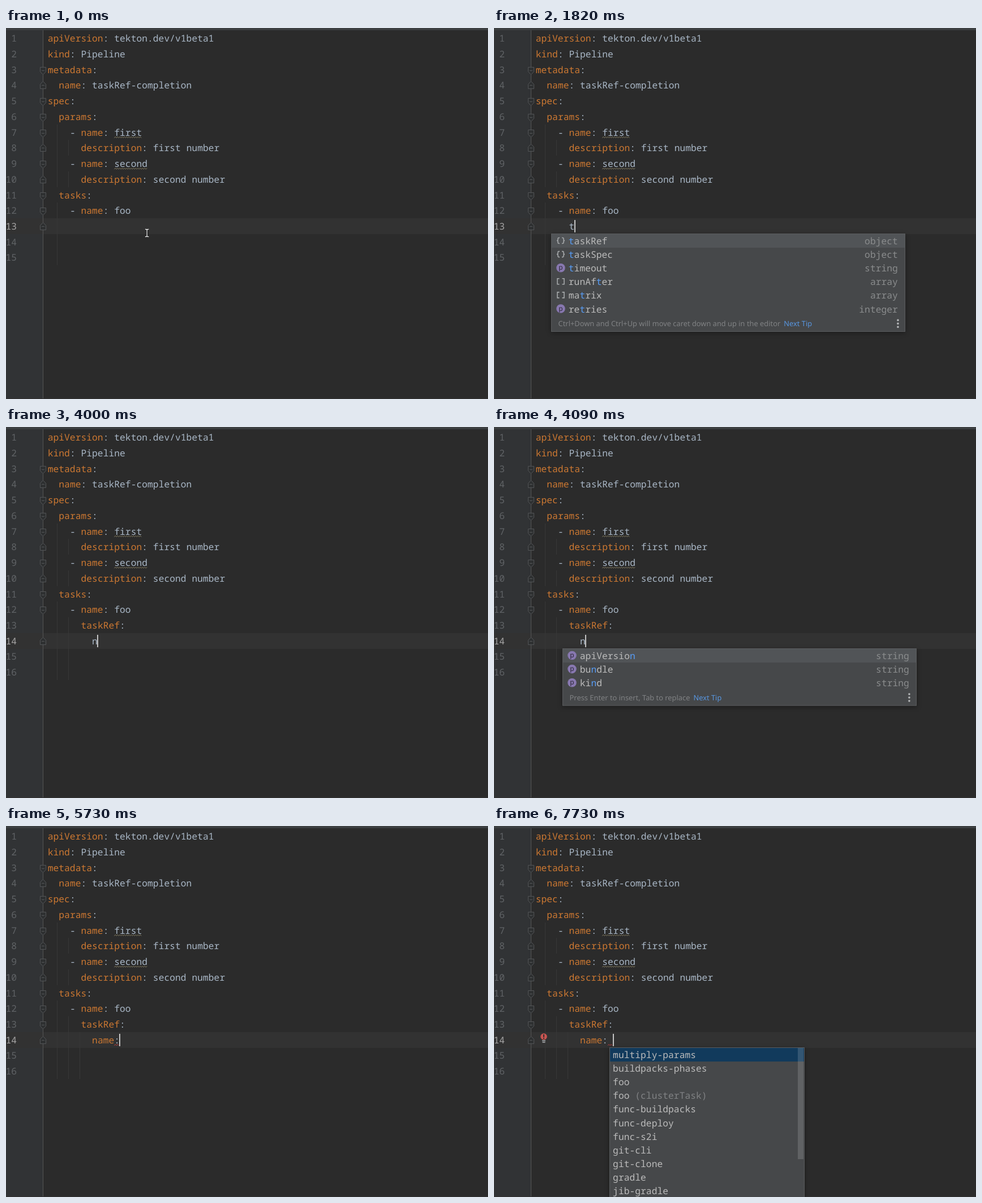
Animation, 852 px wide and 657 px high, one loop 8 s. Source, as an HTML page:

```html
<!DOCTYPE html>
<html lang="en">
<head>
<meta charset="utf-8">
<title>Editor completion</title>
<style>
  html, body { margin: 0; width: 100%; height: 100%; overflow: hidden; background: #2b2b2b; }
  svg { display: block; width: 852px; height: 657px; }
  text { font: 16.33px "Noto Sans Mono", "DejaVu Sans Mono", monospace; fill: #a9b7c6; white-space: pre; text-rendering: geometricPrecision; }
  .key { fill: #cc7832; }
  .num { fill: #606366; text-anchor: end; }
  .num.now { fill: #a4a3a3; }
  .item { fill: #bbbbbb; }
  .hit, .link { fill: #589df6; }
  .type { fill: #8a8c8d; text-anchor: end; }
  .dim { fill: #808284; }
  .tip { font: 12.85px "Noto Sans", "Open Sans", sans-serif; fill: #808284; }
  .tip .link { fill: #5896e0; }
  .letter { font: 12px "Noto Sans", sans-serif; fill: #2b2735; text-anchor: middle; }
  .wave, .icon { fill: none; }
  .icon { stroke: #a6a9ab; stroke-width: 1.6; }
  .fold { fill: #2e3031; stroke: #535557; }
  .guide { stroke: #373737; }
  .popup { filter: drop-shadow(0 2px 4px rgba(0, 0, 0, .35)); }
</style>
</head>
<body>
<svg id="stage" viewBox="0 0 852 657" xmlns="http://www.w3.org/2000/svg"></svg>
<script>
const LOOP = 8000, LEFT = 73.7, CHAR = 9.8, PITCH = 27.72, ROW = 24.1;
const stage = document.getElementById('stage');

const code = [
  'apiVersion: tekton.dev/v1beta1',
  'kind: Pipeline',
  'metadata:',
  '  name: taskRef-completion',
  'spec:',
  '  params:',
  '    - name: first',
  '      description: first number',
  '    - name: second',
  '      description: second number',
  '  tasks:',
  '    - name: foo'
];

const menus = {
  task: {
    x: 101, y: 364, w: 626, hit: 't',
    tip: 'Ctrl+Down and Ctrl+Up will move caret down and up in the editor',
    rows: ['taskRef object', 'taskSpec object', 'timeout string', 'runAfter array', 'matrix array', 'retries integer']
  },
  ref: {
    x: 121, y: 392, w: 626, hit: 'n',
    tip: 'Press Enter to insert, Tab to replace',
    rows: ['apiVersion string', 'bundle string', 'kind string']
  }
};
const taskNames = ['multiply-params', 'buildpacks-phases', 'foo', 'foo (clusterTask)', 'func-buildpacks',
  'func-deploy', 'func-s2i', 'git-cli', 'git-clone', 'gradle', 'jib-gradle'];

// Each step changes only the listed parts of the state.
const steps = [
  [0, { row: 13, total: 15, end: 13, first: '', second: '', mouse: true, caret: null }],
  [450, { caret: 6 }],
  [1550, { first: 't', caret: 7, mouse: false }],
  [1640, { popup: () => shade(101, 364, 626, 174) }],
  [1730, { popup: () => menu(menus.task) }],
  [2640, { caret: null }],
  [2730, { popup: null }],
  [2820, { first: 'taskRef:', row: 14, total: 16, caret: 8 }],
  [3090, { end: 14 }],
  [4000, { second: 'n', caret: 9 }],
  [4090, { popup: () => menu(menus.ref) }],
  [4360, { second: 'na', caret: 10 }],
  [4450, { popup: null }],
  [4730, { second: 'nam', caret: 11 }],
  [4910, { second: 'name', caret: 12 }],
  [5270, { second: 'name:', caret: 13 }],
  [5730, { nested: true, error: 12 }],
  [5910, { second: 'name: ', caret: 14 }],
  [6270, { error: 13 }],
  [7000, { popup: () => shade(204.5, 392, 345, 53) }],
  [7090, { popup: () => names(1) }],
  [7450, { bulb: true }],
  [7730, { popup: () => names(taskNames.length) }]
];
let state = {};
const states = steps.map(([, change]) => state = { ...state, ...change });

const colX = col => LEFT + col * CHAR;
const midY = line => 18.3 + (line - 1) * PITCH;
const topY = line => Math.round(midY(line) - PITCH / 2);
const rect = (x, y, w, h, fill, more = '') => `<rect x="${x}" y="${y}" width="${w}" height="${h}" fill="${fill}" ${more}/>`;
const text = (x, y, body, cls = '') => `<text x="${x}" y="${Math.round(y)}" class="${cls}">${body}</text>`;
const span = (body, cls) => `<tspan class="${cls}">${body}</tspan>`;

function codeLine(line, source) {
  const indent = source.search(/\S/);
  if (indent < 0) return '';
  const body = source.trimStart().replace(/^(- )?(\w+)(?=:)/, (_, dash = '', key) => dash + span(key, 'key'));
  return text(colX(indent), midY(line) + 6, body);
}

function wave(line, from, to, color) {
  const y = midY(line) + 9;
  let d = '';
  for (let x = colX(from), i = 0; x <= colX(to); x += 2, i++)
    d += `${i ? 'L' : 'M'}${x.toFixed(1)} ${(y + (i % 2 ? -1.1 : 1.1)).toFixed(1)}`;
  return `<path class="wave" d="${d}" stroke="${color}"/>`;
}

function fold(line, closing) {
  const y = Math.round(midY(line)) + (closing ? 6.5 : -4.5), s = closing ? -1 : 1;
  return `<path class="fold" d="M60.5 ${y}H70.5V${y + 8 * s}L65.5 ${y + 13 * s}L60.5 ${y + 8 * s}ZM63 ${y + 6 * s}H68"/>`;
}

function guide(col, from, to) {
  const x = Math.floor(colX(col) - 2.4) + .5;
  return `<path class="guide" d="M${x} ${topY(from)}V${topY(to + 1)}"/>`;
}

const shade = (x, y, w, h) => rect(x, y, w, h, '#2b2b2b', 'class="popup"');
const frame = (x, y, w, h) => rect(x + .5, y + .5, w - 1, h - 1, '#46484a', 'stroke="#5b5d5f" class="popup"');

function icon(type, x, y) {
  if (type === 'object')
    return `<path class="icon" d="M${x - 2} ${y - 5}h-1.5q-1.5 0-1.5 1.5v2q0 1.5-2 1.5q2 0 2 1.5v2q0 1.5 1.5 1.5h1.5M${x + 2} ${y - 5}h1.5q1.5 0 1.5 1.5v2q0 1.5 2 1.5q-2 0-2 1.5v2q0 1.5-1.5 1.5h-1.5"/>`;
  if (type === 'array')
    return `<path class="icon" d="M${x - 2.5} ${y - 5}h-3.5v10h3.5M${x + 2.5} ${y - 5}h3.5v10h-3.5"/>`;
  return `<circle cx="${x}" cy="${y}" r="7.8" fill="#8878b0"/>` + text(x, y + 3.6, 'p', 'letter');
}

function tipBar(x, y, w, tip) {
  const dots = [-6, 0, 6].map(d => `<circle cx="${x + w - 13}" cy="${y + d}" r="1.8" fill="#b4b6b8"/>`).join('');
  return text(x + 12.6, y + 4.6, `${tip}<tspan class="link" dx="6">Next Tip</tspan>`, 'tip') + dots;
}

function menu({ x, y, w, hit, tip, rows }) {
  const h = rows.length * ROW + 29.4;
  let out = frame(x, y, w, h) + rect(x + 1, y + 1, w - 2, ROW, '#515457');
  rows.forEach((row, i) => {
    const [name, type] = row.split(' '), mid = y + 13 + i * ROW;
    out += icon(type, x + 17, mid - .5)
      + text(x + 30.8, mid + 6, name.replace(hit, span(hit, 'hit')), 'item')
      + text(x + 612.9, mid + 6, type, 'type');
  });
  return out + tipBar(x, y + h - 14.6, w, tip);
}

function names(count) {
  const x = 204, y = 392, w = 345, full = count > 1;
  let out = frame(x, y, w, full ? 290 : 53) + rect(x + 1, y + 1, w - 2, ROW, '#113a5c');
  taskNames.slice(0, count).forEach((name, i) => {
    out += text(x + 6.1, y + 19 + i * ROW, name.replace(/\(.*/, m => span(m, 'dim')), 'item');
  });
  return out + (full ? rect(537, 393, 10, 197, 'rgba(255,255,255,.14)') : tipBar(x, y + 38.5, w, menus.ref.tip));
}

const mouse = () => {
  const d = 'M246 356.5h2.2l1 1l1-1h2.2M249.2 357.5v11M246 369.5h2.2l1-1l1 1h2.2';
  return `<path class="wave" d="${d}" stroke="#111" stroke-width="3"/><path class="wave" d="${d}" stroke="#f2f2f2" stroke-width="1.3"/>`;
};

const bulb = () => `<circle cx="88" cy="373" r="5.8" fill="#c75450"/>`
  + rect(87, 369, 2, 5, '#2f2f2f') + rect(87, 375, 2, 2, '#2f2f2f')
  + rect(85, 379.5, 6, 1.6, '#a8aaac') + rect(85.5, 382.2, 5, 1.6, '#a8aaac');

function draw(s) {
  const top = topY(s.row);
  const lines = [...code, s.first && '      ' + s.first, s.second && '        ' + s.second];
  const starts = [3, 5, 6, 7, 9, 11, 12, ...(s.nested ? [13] : [])];
  let out = rect(0, 0, 852, 657, '#2b2b2b') + rect(0, 0, 66, 657, '#313335')
    + rect(0, top, 852, topY(s.row + 1) - top, '#323232')
    + rect(65, 4, 1, 653, '#555555') + rect(0, 0, 852, 4, '#3c3f41') + rect(0, 656, 852, 1, '#323232');
  out += guide(2, 7, 10) + guide(4, 8, 8) + guide(4, 10, 10) + guide(2, 12, s.total);
  if (s.total > 15) out += guide(4, 13, 16);
  if (s.nested) out += guide(6, 14, 16);
  for (let n = 1; n <= s.total; n++)
    out += text(19, midY(n) + 6, n, n === s.row ? 'num now' : 'num');
  out += starts.map(n => fold(n)).join('') + [4, 8, 10, s.end].map(n => fold(n, true)).join('');
  out += lines.map((line, i) => codeLine(i + 1, line)).join('');
  out += wave(7, 12, 17, '#857d61') + wave(9, 12, 18, '#857d61');
  if (s.error) out += wave(14, s.error, s.error + 1, '#bc3f3c');
  if (s.caret) out += rect(Math.round(colX(s.caret) - .8), top + 3, 2, 22, '#c4c4c4');
  if (s.bulb) out += bulb();
  if (s.popup) out += s.popup();
  if (s.mouse) out += mouse();
  stage.innerHTML = out;
}

let shown = -1;
function tick() {
  const t = performance.now() % LOOP;
  const now = steps.findLastIndex(([at]) => at <= t);
  if (now !== shown) draw(states[shown = now]);
  requestAnimationFrame(tick);
}
tick();
</script>
</body>
</html>
```
